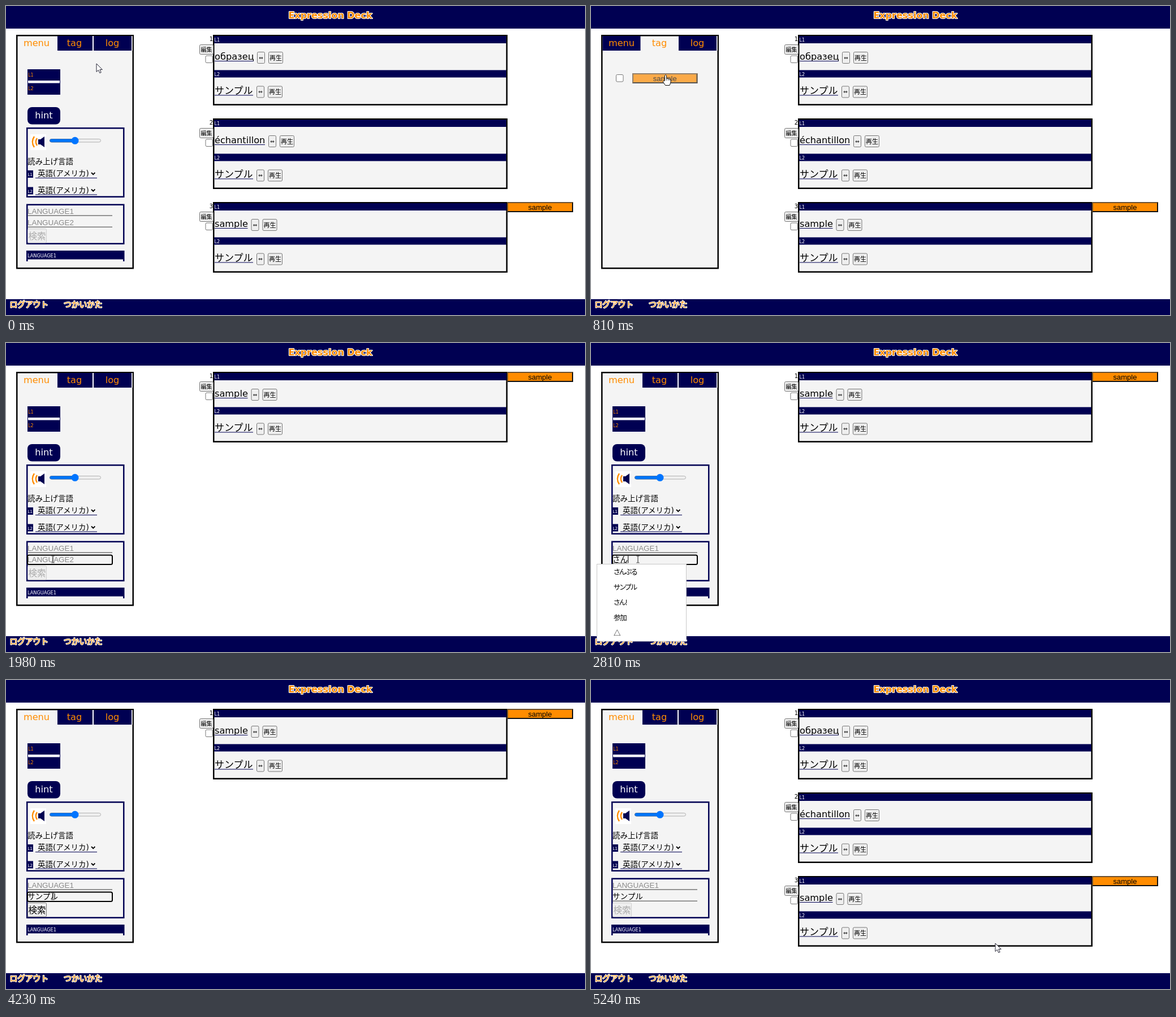
Recreate the animation shown at these times as an HTML page. Size 1024 px wide and 547 px high, loop 5.32 s.

```html
<!DOCTYPE html>
<html lang="ja">
<head>
<meta charset="utf-8">
<title>Expression Deck</title>
<style>
html, body { margin: 0; width: 100%; height: 100%; overflow: hidden; background: #fff; }
svg { display: block; width: 100%; height: 100%; }
text { font-family: "DejaVu Sans", "Noto Sans CJK JP", sans-serif; white-space: pre; }
.arial { font-family: "Liberation Sans", "Noto Sans CJK JP", sans-serif; }
.cjk { font-family: "Noto Sans CJK JP", sans-serif; }
.ime { font-family: "Noto Sans CJK JP", sans-serif; font-feature-settings: "palt"; letter-spacing: -1.2px; }
.halo { stroke: #fff; stroke-width: 2.2px; stroke-linejoin: round; paint-order: stroke; }
</style>
</head>
<body>
<svg id="stage" viewBox="0 0 1024 547" preserveAspectRatio="none"></svg>
<script>
const LOOP = 5320;
const NAVY = '#000052', ORANGE = '#ff8c00', PALE = '#f4f4f4', GREY = '#767676';
const stage = document.getElementById('stage');

const rect = (x, y, w, h, fill, more = '') =>
  `<rect x="${x}" y="${y}" width="${w}" height="${h}" fill="${fill}" ${more}/>`;
const text = (x, y, size, fill, str, more = '') =>
  `<text x="${x}" y="${y}" font-size="${size}" fill="${fill}" ${more}>${str}</text>`;
const path = (d, fill, more = '') => `<path d="${d}" fill="${fill}" ${more}/>`;
const line = (x1, x2, y, color, w = 1) => rect(x1, y - w / 2, x2 - x1, w, color);
const group = (more, body) => `<g ${more}>${body}</g>`;
const at = (x, y, body) => group(`transform="translate(${x} ${y})"`, body);
const frame = (x, y, w, h, color, fill = 'none') =>
  rect(x + 1.25, y + 1.25, w - 2.5, h - 2.5, fill, `stroke="${color}" stroke-width="2.5"`);
const MID = 'text-anchor="middle"';

// Last entry of a timed list whose start has passed
const pick = (list, t) => list.reduce((found, e) => (e[0] <= t ? e : found));

const pointer = [
  [0, 160, 102, 'arrow'], [70, 157, 97, 'arrow'], [140, 149, 87, 'arrow'],
  [200, 138, 76, 'hand'], [270, 130, 71, 'hand'], [340, 127, 69, 'hand'],
  [740, 130, 96, 'arrow'], [810, 132, 121, 'hand'],
  [1010, 131, 116, 'arrow'], [1140, 131, 111, 'arrow'],
  [1290, 124, 100, 'arrow'], [1360, 110, 84, 'arrow'], [1430, 84, 72, 'hand'],
  [1500, 64, 68, 'hand'], [1630, 66, 110, 'arrow'], [1700, 74, 190, 'arrow'],
  [1770, 80, 272, 'arrow'], [1840, 82, 330, 'arrow'], [1910, 83, 383, 'beam'],
  [4240, 76, 386, 'beam'], [4310, 70, 396, 'hand'], [4490, 66, 399, 'hand'],
  [4830, 65, 400, 'blocked'], [4970, 150, 415, 'arrow'], [5040, 390, 440, 'arrow'],
  [5170, 650, 462, 'arrow'], [5240, 715, 466, 'arrow']
];

const typed = [
  [0, ''], [2330, 'ｓ'], [2400, 'さ'], [2740, 'さｎ'], [2810, 'さん'], [3140, 'さんｐ'],
  [3420, 'さんぷ'], [3560, 'さんぷｒ'], [3630, 'さんぷる'], [3770, 'サンプル']
];

const popups = [
  [0, 0, ''],
  [2540, 166, 'さ さん さっき 最近 さあ'],
  [2810, 158, 'さんぷる サンプル さん! 参加 △'],
  [3420, 158, 'さんぷる サンプル サンプ さんぷ 散布'],
  [3700, 166, 'さんぷる サンプル サンプル用 サンプリング サンプルを'],
  [4170, 0, '']
];

const cursors = {
  arrow: path('M0 0V14.5L3.4 11.4 5.8 16.6 8.2 15.6 5.9 10.6H10.3Z', '#fff', 'stroke="#223"'),
  hand: path('M-1.5 11V2Q0 -.5 1.5 2V7.5L3 7 4.5 8 6 7.6 7.2 8.7 9 9.3V14L7 19.5H-.5L-4.5 13.5Q-5 10.5 -2.5 12Z',
    '#fff', 'stroke="#111" stroke-linejoin="round"') + path('M1.5 7.5V11M4.5 8V11M7.2 9V11', 'none', 'stroke="#111" stroke-width=".7"'),
  beam: path('M-2.5 -6H-.5L0 -5.5 .5 -6H2.5M0 -5.5V5.5M-2.5 6H-.5L0 5.5 .5 6H2.5', 'none', 'stroke="#222"'),
  blocked: '<circle r="6" fill="#fff" stroke="#c4141c" stroke-width="2.2"/>' +
    path('M-4 -4L4 4', 'none', 'stroke="#c4141c" stroke-width="2.2"')
};

function button(x, y, w, h, size, label, ink = '#000', edge = GREY) {
  return rect(x + .5, y + .5, w - 1, h - 1, '#efefef', `stroke="${edge}" rx="2"`) +
    text(x + w / 2, y + h / 2 + size * .38, size, ink, label, MID);
}

const checkbox = (x, y) => rect(x + .5, y + .5, 12.5, 12.5, '#fff', `stroke="${GREY}" rx="2"`);

function tag(x, y, w, opacity = 1) {
  return group(`opacity="${opacity}"`,
    rect(x, y, w, 18, ORANGE) +
    path(`M${x} ${y + 18}V${y}H${x + w}L${x + w - 2} ${y + 2}H${x + 2}V${y + 16}Z`, '#6b5030') +
    path(`M${x} ${y + 18}H${x + w}V${y}L${x + w - 2} ${y + 2}V${y + 16}H${x + 2}Z`, '#111') +
    text(x + w / 2, y + 13.5, 13, '#000', 'sample', `class="arial" ${MID}`));
}

function side(y, label, word, end, size) {
  return rect(368, y, 517, 13, NAVY) + text(368.5, y + 10, 8, '#fff', label) +
    text(369, y + 42, size, '#000', word) + line(369, end, y + 44.5, NAVY) +
    button(end + 6, y + 28, 14, 21, 9, '⇔') + button(end + 26, y + 28, 26, 21, 11, '再生');
}

function card(i, word, end, tagged) {
  return at(0, i * 148,
    frame(366, 51, 521, 125, '#000', PALE) +
    side(53, 'L1', word, end, 16.2) + side(113.5, 'L2', 'サンプル', 437, 17) +
    text(366, 62, 10, '#000', i + 1, 'text-anchor="end"') +
    button(342, 68, 25, 18, 10, '編集') + checkbox(352.5, 87.5) +
    (tagged ? tag(886, 51, 117) : ''));
}

function tabs(active, hover) {
  return ['menu', 'tag', 'log'].map((name, i) => {
    const x = [20.5, 88, 155][i], on = name === active;
    const gap = i === 1 && active === 'menu';
    return group(`opacity="${name === hover ? .7 : 1}"`,
      (on ? '' : rect(gap ? 91 : x, 53, gap ? 62 : 67, 26, NAVY)) +
      text([54, 121, 188][i], 71, 16.2, ORANGE, name, MID));
  }).join('') + (active === 'menu' ? rect(153, 53, 2, 26, '#fff') : '') + rect(222, 53, 1.5, 26, '#fff');
}

function voice(y, label) {
  return rect(38, y, 10, 13, NAVY) + text(38.2, y + 10, 7.5, '#fff', label) +
    text(56, y + 10, 13.5, '#000', '英語(アメリカ)') + line(52, 161, y + 13.5, NAVY) +
    path(`M151 ${y + 4}l3.2 3.2 3.2 -3.2`, 'none', 'stroke="#000" stroke-width="1.8"');
}

const sound = rect(43, 227, 28, 28, '#fff') +
  path('M57 236H61L68 231V250L61 245H57Z', NAVY) +
  path('M55 234Q50.500 240.500 55 247M50 231Q43.500 240.500 50 250', 'none', `stroke="${ORANGE}" stroke-width="2.4"`);

const slider = rect(77.5, 235.5, 90, 5.5, '#efefef', 'stroke="#b2b2b2" rx="3"') +
  rect(77.5, 235.5, 45, 5.5, '#0075ff', 'stroke="#3b6fae" rx="3"') +
  '<circle cx="122" cy="238.3" r="6.5" fill="#0075ff"/>';

const menuTop = rect(38, 112, 58, 45, NAVY) + rect(39, 132, 56, 4.5, '#fff') +
  text(39, 124.5, 8, ORANGE, 'L1') + text(39, 149, 8, ORANGE, 'L2') +
  rect(38, 179, 58, 30.5, NAVY, 'rx="8"') + text(67, 199, 16.2, '#fff', 'hint', MID) +
  frame(36, 215, 173.5, 124, NAVY) + sound + slider +
  text(38, 280, 13.5, '#000', '読み上げ言語') +
  voice(291, 'L1') + voice(320.500, 'L2') +
  frame(36, 350.5, 173.5, 71.5, NAVY) +
  rect(36, 433, 173.5, 15.5, NAVY) + rect(36, 448, 2.5, 4, NAVY) + rect(207, 448, 2.5, 4, NAVY) +
  text(38, 445, 8.2, '#fff', 'LANGUAGE1') +
  text(38, 367.5, 13.4, '#8a8a8a', 'LANGUAGE1', 'class="arial"') + line(38, 188, 371, GREY, 1.5);

function search(t) {
  const str = pick(typed, t)[1];
  const focus = t >= 1980 && t < 4630, composing = t >= 2330 && t < 4170;
  const ready = t >= 4170 && t < 4900;
  const end = 38 + str.length * 13.6;
  return (focus ? rect(38, 375.5, 150, 16.5, PALE, 'stroke="#000" stroke-width="2" rx="2.5"')
                : line(38, 188, 391.3, GREY, 1.5)) +
    (str ? text(38, 388, 13.6, '#000', str, 'class="cjk"')
         : text(38, 387.8, 13.4, '#8a8a8a', 'LANGUAGE2', 'class="arial"')) +
    (composing ? path(`M38 389.500H${end}`, 'none', 'stroke="#222" stroke-dasharray="2 1"') +
      rect(end, 376.500, 1, 13, '#000') : '') +
    button(38, 394, 34, 25.5, 15.5, '検索', ready ? '#000' : '#ababab', ready ? GREY : '#cfcfcf');
}

function popup(t) {
  const [, width, words] = pick(popups, t);
  if (!width) return '';
  return rect(10.5, 391.5, width, 136.5, '#fff', 'stroke="#c8c8c8"') +
    words.split(' ').map((w, i) => text(40, 409.500 + i * 27, 12.5, '#000', w, 'class="ime"')).join('');
}

const bars = rect(0, 0, 1024, 547, '#fff') + rect(0, 0, 1024, 40, NAVY) + rect(0, 519, 1024, 28, NAVY) +
  text(573.5, 22, 16, ORANGE, 'Expression Deck', `class="halo" font-weight="bold" ${MID}`) +
  text(6.5, 533, 13.7, ORANGE, 'ログアウト', 'class="halo"') +
  text(102, 533, 13.7, ORANGE, 'つかいかた', 'class="halo"') +
  frame(18, 51, 208, 414.5, '#000', PALE);

const allCards = card(0, 'образец', 438) + card(1, 'échantillon', 458) + card(2, 'sample', 427.5, true);
const oneCard = card(0, 'sample', 427.5, true);

function scene(t) {
  const [, x, y, kind] = pick(pointer, t);
  const tagView = t >= 480 && t < 1560;
  const hoverTab = t >= 200 && t < 480 ? 'tag' : t >= 1430 && t < 1560 ? 'menu' : '';
  const panel = tagView
    ? checkbox(44, 121) + tag(73, 119, 115.5, t >= 810 && t < 1010 ? .7 : 1)
    : menuTop + search(t);
  return bars + tabs(tagView ? 'tag' : 'menu', hoverTab) + panel +
    (t >= 1290 && t < 4900 ? oneCard : allCards) + popup(t) + at(x, y, cursors[kind]);
}

let shown = '';
function tick(now) {
  const next = scene(now % LOOP);
  if (next !== shown) stage.innerHTML = shown = next;
  requestAnimationFrame(tick);
}
tick(performance.now());
</script>
</body>
</html>
```
